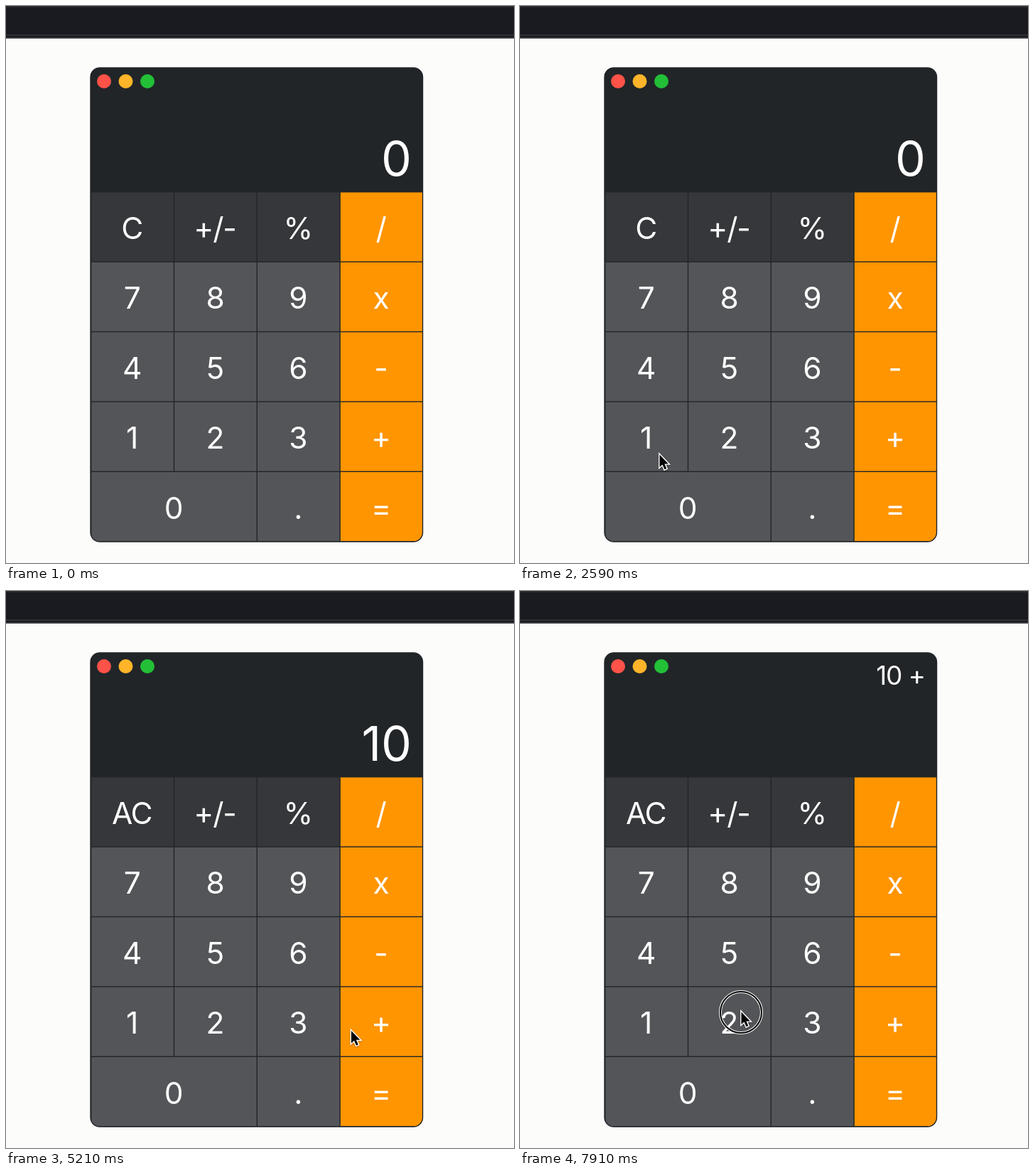
Animation of 715 by 784 pixels, one loop 8000 ms. Source, as an HTML page:

```html
<!DOCTYPE html>
<html lang="en">
<head>
<meta charset="utf-8">
<title>Calculator</title>
<style>
  html, body { margin: 0; width: 100%; height: 100%; overflow: hidden; background: #fcfcfb; }
  svg { display: block; }
  text { font: 400 42.5px Inter, sans-serif; letter-spacing: -.03em; fill: #fff; text-anchor: middle; }
  #main, #sub { text-anchor: end; }
  #main { font-size: 68px; letter-spacing: 0; }
  #sub { font-size: 37px; }
</style>
</head>
<body>
<svg width="715" height="784" viewBox="0 0 715 784">
  <rect width="715" height="784" fill="#fcfcfb"/>
  <rect width="715" height="45.5" fill="#1a1b20"/>
  <rect width="715" height="2" fill="#2a2b2f"/>
  <rect y="40" width="715" height="2" fill="#2e2f33"/>
  <rect y="44" width="715" height="1.5" fill="#35363a"/>
  <clipPath id="body"><rect x="119" y="87" width="467.5" height="667" rx="13"/></clipPath>
  <g id="keys" clip-path="url(#body)">
    <rect x="118" y="86" width="470" height="669" fill="#212528"/>
  </g>
  <rect x="119" y="87" width="467.5" height="667" rx="13" fill="none" stroke="#222629" stroke-width="1.4"/>
  <circle cx="138" cy="106" r="10" fill="#ff5248"/>
  <circle cx="168.5" cy="106" r="10" fill="#ffb429"/>
  <circle cx="199" cy="106" r="10" fill="#23bf37"/>
  <text id="sub" x="570" y="132"></text>
  <text id="main" x="571" y="239"></text>
  <g id="pointer">
    <g id="ring" fill="none">
      <circle cx="1" cy="3" r="29" stroke="#fff" stroke-width="4"/>
      <circle cx="1" cy="3" r="29" stroke="#000" stroke-width="2"/>
    </g>
    <path id="arrow" d="M1.5 2.5V20L5.5 16.4L8.5 23.3L11.3 22.1L8.4 15.4H13.9Z"
      fill="#000" stroke="#fff" stroke-width="2.8" paint-order="stroke"
      style="filter:drop-shadow(0 1px 1px rgba(0,0,0,.3))"/>
    <g id="beam" fill="none" stroke-linecap="square">
      <path id="beamShape" stroke="#fff" stroke-width="4.2"
        d="M-3 -9Q0 -9 0 -6Q0 -9 3 -9M0 -6V6M-3 9Q0 9 0 6Q0 9 3 9M-2 3H2"/>
      <path id="beamCore" stroke="#000" stroke-width="1.7"/>
    </g>
  </g>
</svg>
<script>
const $ = id => document.getElementById(id);
const LOOP = 8000;

// Keypad
const rows = [['C', '+/-', '%', '/'], ['7', '8', '9', 'x'], ['4', '5', '6', '-'],
              ['1', '2', '3', '+'], ['0', '', '.', '=']];
const left = 120.4, top0 = 262.4, colW = 116.8, rowH = 98.4, gap = 1.4;

function add(tag, attrs, label) {
  const node = document.createElementNS($('keys').namespaceURI, tag);
  for (const name in attrs) node.setAttribute(name, attrs[name]);
  if (label) node.textContent = label;
  return $('keys').appendChild(node);
}

let clearKey;
rows.forEach((row, r) => row.forEach((label, c) => {
  if (!label) return;
  const span = label === '0' ? 2 : 1;
  const x = left + c * colW, y = top0 + r * rowH, width = span * colW - gap;
  add('rect', { x, y, width, height: rowH - gap,
    fill: c === 3 ? '#ff9500' : r ? '#545559' : '#36373b' });
  const text = add('text', { x: x + width / 2 - 1, y: y + 65.6 }, label);
  if (label === 'C') clearKey = text;
}));
$('beamCore').setAttribute('d', $('beamShape').getAttribute('d'));

const entry = { x: 291, y: 807 };
const moves = [
  { from: 27, to: 49, x: 195, y: 629 },
  { from: 70, to: 83, x: 226, y: 706 },
  { from: 95, to: 114, x: 503, y: 610 },
  { from: 146, to: 164, x: 310, y: 590 },
];
const presses = [{ at: 58, key: '1' }, { at: 84, key: '0' }, { at: 128, key: '+' }, { at: 168, key: '2' }];
const HOLD = 3;

function captureAt(ms) {
  const t = ms - 30, block = Math.floor(t / 140);
  return block * 3 + Math.min(2, Math.floor((t - block * 140) / 20));
}

function pointerAt(k) {
  let { x, y } = entry;
  for (const m of moves) {
    const u = Math.min(1, Math.max(0, (k - m.from) / (m.to - m.from)));
    const eased = u * u * (3 - 2 * u);
    x += (m.x - x) * eased;
    y += (m.y - y) * eased;
  }
  return { x, y };
}

function displayAt(k) {
  let main = '0', sub = '', clear = 'C';
  for (const { at, key } of presses) {
    if (k < at + HOLD) break;
    clear = 'AC';
    if (key === '+') { sub = main + ' +'; main = ''; }
    else main = main === '0' ? key : main + key;
  }
  return { main, sub, clear };
}

const show = (id, on) => $(id).style.display = on ? '' : 'none';

function draw(ms) {
  const k = captureAt(ms);
  const { main, sub, clear } = displayAt(k);
  $('main').textContent = main;
  $('sub').textContent = sub;
  clearKey.textContent = clear;

  const { x, y } = pointerAt(k);
  const overZero = Math.abs(x - 235) < 14 && Math.abs(y - 706) < 27;
  $('pointer').setAttribute('transform', `translate(${x} ${y})`);
  show('beam', overZero);
  show('arrow', !overZero);
  show('ring', presses.some(({ at }) => k >= at && k < at + HOLD));
}

const start = performance.now();
function tick() {
  draw((performance.now() - start) % LOOP);
  requestAnimationFrame(tick);
}
tick();
</script>
</body>
</html>
```
